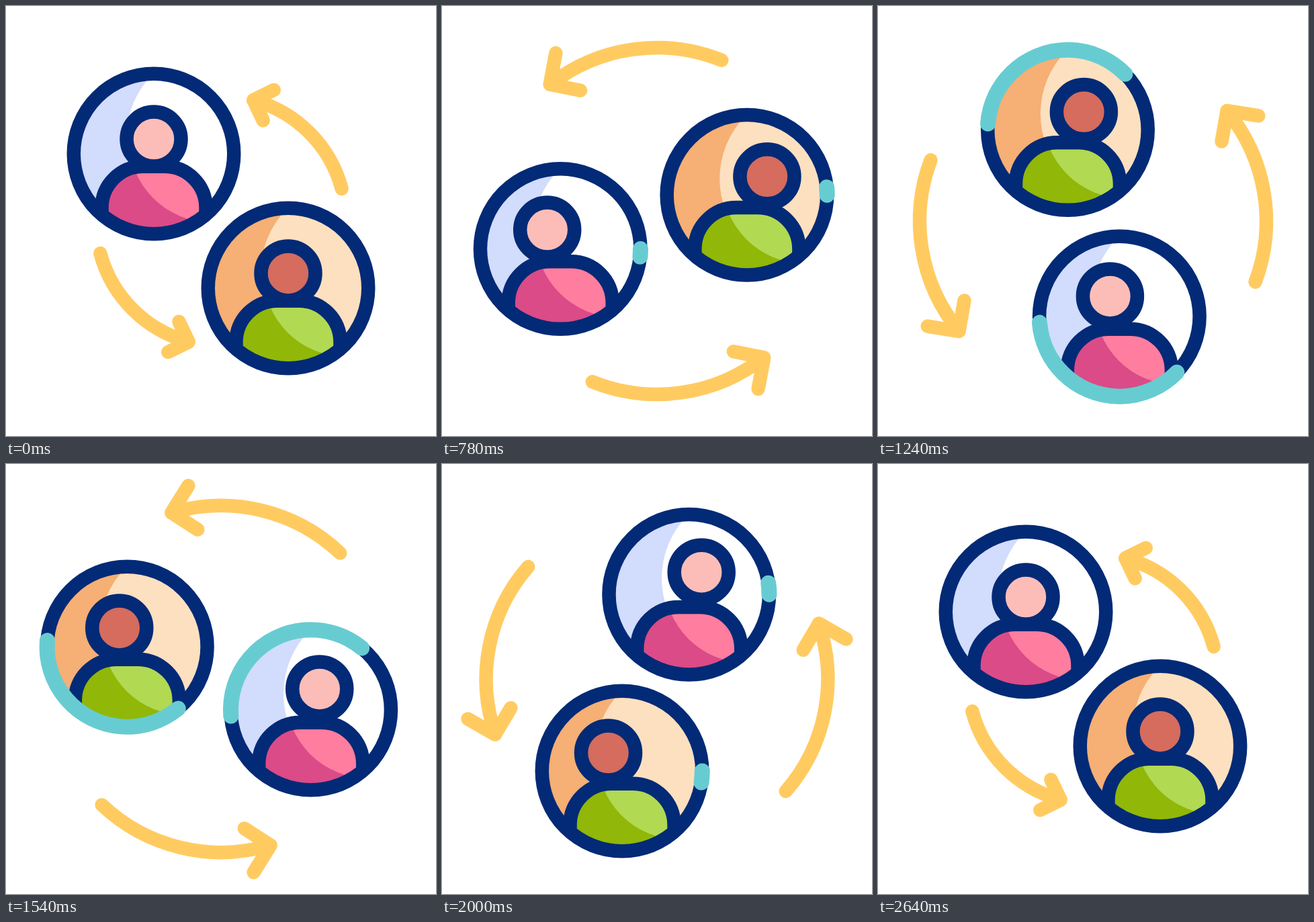
Recreate the animation shown at these times as an HTML page with a canvas. Size 640x640 px, loop 3 s.

```html
<!DOCTYPE html>
<html>
<head>
<meta charset="utf-8">
<style>
  html, body { margin: 0; height: 100%; overflow: hidden; background: #fff; }
  canvas { display: block; }
</style>
</head>
<body>
<canvas id="stage" width="640" height="640"></canvas>
<script>
const ctx = document.getElementById('stage').getContext('2d');
const LOOP = 3000, START = 200, END = 2600, MID = 320, TAU = Math.PI * 2;
const NAVY = '#032a76', YELLOW = '#ffcb61', TEAL = '#67ccd1';
const LINE = 20.5, RING = 119.25;
const rad = deg => deg * Math.PI / 180;
const progress = (t, from, to) => Math.min(1, Math.max(0, (t - from) / (to - from)));
const smooth = u => u * u * (3 - 2 * u);
const ease = (t, from, to) => smooth(progress(t, from, to));

// cubic-bezier(.25, 0, .75, 1)
function softEase(x) {
  let lo = 0, hi = 1;
  for (let i = 0; i < 24; i++) {
    const s = (lo + hi) / 2, q = 1 - s;
    if (0.75 * s * q * q + 2.25 * s * s * q + s ** 3 < x) lo = s; else hi = s;
  }
  return smooth(lo);
}

// Smooth curve through (time, value) points, at rest at both ends
function track(times, values) {
  const slope = i => (values[i + 1] - values[i]) / (times[i + 1] - times[i]);
  const tangents = times.map((time, i) => {
    if (i === 0 || i === times.length - 1) return 0;
    const before = time - times[i - 1], after = times[i + 1] - time;
    return (slope(i - 1) * after + slope(i) * before) / (before + after);
  });
  return t => {
    const last = times.length - 1;
    if (t <= times[0]) return values[0];
    if (t >= times[last]) return values[last];
    const i = times.findIndex(time => time > t) - 1;
    const span = times[i + 1] - times[i], u = (t - times[i]) / span, q = 1 - u;
    return values[i] + (values[i + 1] - values[i]) * smooth(u)
      + span * u * q * (tangents[i] * q - tangents[i + 1] * u);
  };
}

const orbitTimes = [200, 380, 690, 780, 1150, 1240, 1540, 2000, 2130, 2360, 2620];
const poseTimes = [200, 380, 780, 1240, 1540, 2000, 2620];
const sway = track(poseTimes, [0, -0.4, -1.3, 2.2, -2.1, -0.3, 0]);

const people = [
  {
    from: 225, turn: 1,
    back: '#fff', backShade: '#d2dcfd', skin: '#fcbdb8', shirt: '#ff7d9f', shirtShade: '#db4b87',
    radius: track(orbitTimes, [141.4, 143.7, 151.3, 149.7, 148.3, 147.3, 141.4, 134.5, 138, 140.7, 141.4]),
    headX: track(poseTimes, [0, -5.6, -19.5, -14, 13, 18.5, 0]),
    headY: track(poseTimes, [-22, -24, -28.5, -30, -31, -33, -22])
  },
  {
    from: 45, turn: -1,
    back: '#fde0bf', backShade: '#f6af74', skin: '#d56c5d', shirt: '#b1d952', shirtShade: '#91b708',
    radius: track(orbitTimes, [141.4, 141, 141.3, 139.4, 144, 140.6, 147.7, 146.5, 148.5, 146, 141.4]),
    headX: track(poseTimes, [0, 9.3, 30, 24, -11.5, -20.5, 0]),
    headY: track(poseTimes, [-22, -24, -27.5, -27, -28, -27, -22])
  }
];

const body = new Path2D(
  'M-77.5 125V80A61.5 61.5 0 0 1 -16 18.7H16A61.5 61.5 0 0 1 77.5 80V125Z');

function disc(x, y, r, fill, stroke) {
  ctx.beginPath();
  ctx.arc(x, y, r, 0, TAU);
  if (fill) { ctx.fillStyle = fill; ctx.fill(); }
  if (stroke) { ctx.strokeStyle = stroke; ctx.stroke(); }
}

function drawPerson(p, t) {
  const angle = rad(p.from - 360 * softEase(progress(t, START, END)) - sway(t));
  const r = p.radius(t);
  ctx.save();
  ctx.translate(MID + r * Math.cos(angle), MID + r * Math.sin(angle));
  ctx.lineWidth = LINE;

  ctx.save();
  ctx.beginPath();
  ctx.arc(0, 0, RING, 0, TAU);
  ctx.clip();
  disc(0, 0, RING, p.backShade);
  disc(93, -24, 133.7, p.back);
  ctx.save();
  ctx.clip(body);
  disc(0, 0, RING, p.shirtShade);
  disc(86, -21, 123, p.shirt);
  ctx.restore();
  ctx.strokeStyle = NAVY;
  ctx.stroke(body);
  disc(p.headX(t), p.headY(t), 40.5, p.skin, NAVY);
  ctx.restore();

  disc(0, 0, RING, null, NAVY);

  const tail = 360 * ease(t, 1000, 2100), lead = 360 * ease(t, 700, 1800);
  if (lead > tail) {
    ctx.beginPath();
    ctx.arc(0, 0, RING, rad(p.turn * tail), rad(p.turn * lead), p.turn < 0);
    ctx.lineWidth = 23;
    ctx.strokeStyle = TEAL;
    ctx.stroke();
  }
  ctx.restore();
}

function drawArrow(from, t) {
  const grow = ease(t, START, 690) - ease(t, 1900, 2640);
  const scale = 1 + 0.387 * grow;
  const polar = (r, deg) => [r * Math.cos(rad(deg)), -r * Math.sin(rad(deg))];
  ctx.save();
  ctx.translate(MID, MID);
  ctx.rotate(-rad(from + 360 * ease(t, START, END)));
  ctx.scale(scale, scale);
  ctx.lineWidth = LINE / scale;
  ctx.strokeStyle = YELLOW;
  ctx.beginPath();
  ctx.arc(0, 0, 186, -rad(15), -rad(75), true);
  ctx.moveTo(...polar(210.4, 68));
  ctx.lineTo(...polar(186.3, 75));
  ctx.lineTo(...polar(162.3, 67.3));
  ctx.stroke();
  ctx.restore();
}

function draw(now) {
  const t = now % LOOP;
  ctx.fillStyle = '#fff';
  ctx.fillRect(0, 0, 640, 640);
  ctx.lineCap = ctx.lineJoin = 'round';
  drawArrow(0, t);
  drawArrow(180, t);
  people.forEach(p => drawPerson(p, t));
  requestAnimationFrame(draw);
}
requestAnimationFrame(draw);
</script>
</body>
</html>
```
